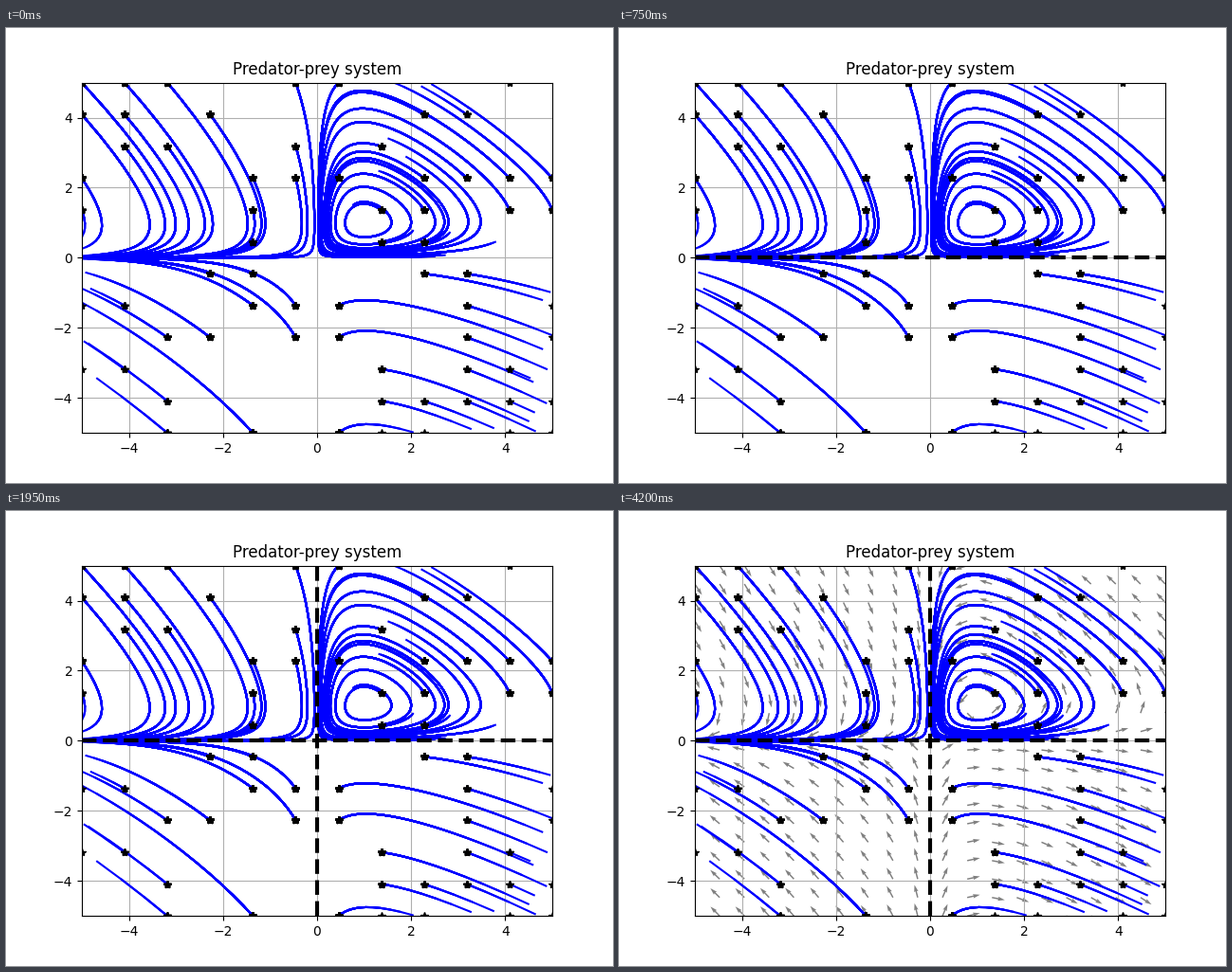
A matplotlib script for the animation above (5500 ms loop, 640 by 480 pixels).

```python
import numpy as np
import matplotlib.pyplot as plt
from matplotlib.animation import FuncAnimation
from matplotlib.collections import LineCollection

LIMIT = 5
DT = 0.025
STEPS = 300
PASSES = 16
FRAMES, INTERVAL = 22, 250
FRAMES_PER_STAGE = 3

# Columns of the 12 x 12 seed grid used in each row, from top to bottom.
SEED_COLUMNS = [
    [0, 1, 2, 5, 6, 10],
    [0, 1, 3, 8, 9],
    [1, 2, 5, 7],
    [0, 4, 5, 6, 8, 9, 10, 11],
    [0, 4, 7, 8, 10, 11],
    [4, 7, 8],
    [3, 4, 8, 9],
    [0, 1, 4, 5, 6, 9, 11],
    [2, 3, 5, 6, 9, 11],
    [0, 1, 7, 9, 10],
    [2, 7, 8, 9, 10, 11],
    [2, 4, 6, 7, 8, 10, 11],
]


def velocity(x, y):
    return x * (1 - y), y * (x - 1)


def trajectory(x, y):
    """Euler path from a seed, ended at the edge of the plot."""
    points = [(x, y)]
    for _ in range(STEPS):
        u, v = velocity(x, y)
        x, y = x + DT * u, y + DT * v
        if max(abs(x), abs(y)) > LIMIT:
            break
        points.append((x, y))
    return points


def growing_strokes(path):
    """Overlapping strokes, so a path is boldest away from its free end."""
    shortest = max(2, len(path) - PASSES + 1)
    return [path[:n] for n in range(shortest, len(path) + 1)]


fig, ax = plt.subplots(figsize=(6.4, 4.8), dpi=100)
ax.set_title("Predator-prey system")
ax.set_xlim(-LIMIT, LIMIT)
ax.set_ylim(-LIMIT, LIMIT)
ax.grid(True)

grid = np.linspace(-LIMIT, LIMIT, 12)
paths = [trajectory(grid[col], y)
         for y, columns in zip(grid[::-1], SEED_COLUMNS) for col in columns]

strokes = [stroke for path in paths for stroke in growing_strokes(path)]
ax.add_collection(LineCollection(
    strokes, colors="blue", linewidths=1.5, capstyle="projecting",
    joinstyle="round", zorder=2), autolim=False)

stars = [path[0] for path in paths for _ in range(min(len(path), PASSES))]
ax.plot(*zip(*stars), "k*", zorder=2.1)

nullcline = dict(color="black", linestyle="--", linewidth=3, zorder=2.2)
prey_axis = ax.axhline(0, **nullcline)
predator_axis = ax.axvline(0, **nullcline)

X, Y = np.meshgrid(*[np.linspace(-LIMIT, LIMIT, 20)] * 2)
U, V = velocity(X, Y)
speed = np.hypot(U, V)
arrows = ax.quiver(X, Y, U / speed, V / speed, color="gray")

layers = [prey_axis, predator_axis, arrows]


def update(frame):
    stage = frame // FRAMES_PER_STAGE
    for order, layer in enumerate(layers):
        layer.set_visible(stage > order)
    return layers


anim = FuncAnimation(fig, update, frames=FRAMES, interval=INTERVAL,
                     repeat=True, repeat_delay=0)
plt.show()
```
